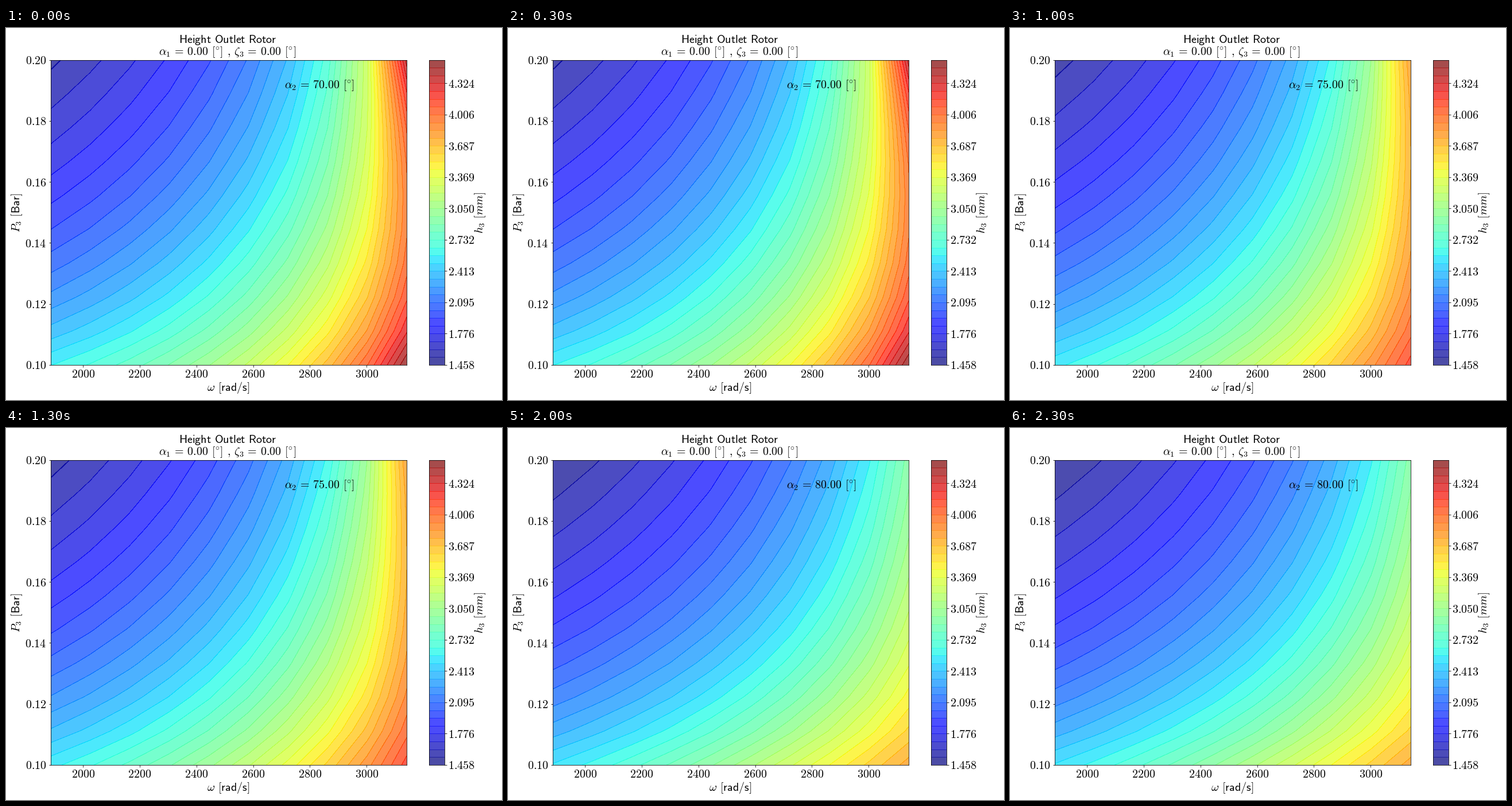
A matplotlib script for the animation above (2500 ms loop, 864 by 648 pixels).

```python
import numpy as np
import matplotlib.pyplot as plt
from matplotlib.animation import FuncAnimation
from matplotlib.colors import Normalize

W, H, DPI = 864, 648, 72
FONT = 20
plt.rcParams.update({"mathtext.fontset": "cm", "font.size": FONT})

LEVELS = np.linspace(1.458, 4.563, 40)
STEP = LEVELS[1] - LEVELS[0]
OMEGA = np.linspace(600 * np.pi, 1000 * np.pi, 10)
PRESSURE = np.linspace(0.1, 0.2, 10)

# Heights in level steps at the knots: angle x pressure x speed
ANGLE_KNOTS = (70, 75, 80)
PRESSURE_KNOTS = (0.10, 0.15, 0.20)
SPEED_KNOTS = OMEGA[[0, 5, 9]] ** 2
KNOTS = np.array([
    [[13.95, 22.2, 38.99], [5.31, 13.15, 31.7], [0.76, 8.1, 37.5]],
    [[13.65, 21.87, 34.5], [5.13, 12.74, 29.3], [0.56, 7.65, 30.0]],
    [[13.1, 20.75, 29.5], [4.49, 10.87, 22.0], [0.01, 5.87, 18.5]],
])
# The inverse square of the height is smooth in squared speed
INVERSE = (LEVELS[0] + STEP * KNOTS) ** -2.0


def lagrange(x, knots):
    """Weights of the polynomial through the knots, one row per x."""
    x = np.atleast_1d(x).astype(float)
    columns = []
    for i, a in enumerate(knots):
        weight = np.ones_like(x)
        for j, b in enumerate(knots):
            if j != i:
                weight = weight * (x - b) / (a - b)
        columns.append(weight)
    return np.stack(columns, axis=1)


SPEED_W = lagrange(OMEGA ** 2, SPEED_KNOTS)
PRESSURE_W = lagrange(PRESSURE, PRESSURE_KNOTS)


def height(angle):
    angle_w = lagrange(angle, ANGLE_KNOTS)[0]
    q = np.einsum("a,aps,yp,xs->yx", angle_w, INVERSE, PRESSURE_W, SPEED_W)
    return np.clip(q ** -0.5, LEVELS[0] + 1e-4, LEVELS[-1] - 1e-4)


def sans(text):
    """Sans-serif math text with full word spaces."""
    text = text.replace(" = ", r"\hspace{0.18}=\hspace{0.18}")
    text = text.replace(" , ", r"\hspace{0.38},\hspace{0.18}")
    text = text.replace(" ", r"\hspace{0.38}")
    return r"\mathsf{" + text + "}"


def angle_text(symbol, value):
    return symbol + sans(f" = {value:.2f} [") + r"^{\circ}" + sans("]")


def box(left, top, right, bottom):
    return fig.add_axes([left / W, 1 - bottom / H,
                         (right - left) / W, (bottom - top) / H])


def label(x, y, text, **kw):
    return fig.text(x, H - y, f"${text}$", transform=None, fontsize=FONT,
                    va="baseline", **{"ha": "center", **kw})


fig = plt.figure(figsize=(W / DPI, H / DPI), dpi=DPI, facecolor="white")
ax = box(77.5, 55.5, 698, 587)
bar = box(737, 55.5, 763.5, 587)

ax.set_xlim(OMEGA[0], OMEGA[-1])
ax.set_ylim(PRESSURE[0], PRESSURE[-1])
ax.set_xticks(range(2000, 3001, 200))
ax.set_yticks(np.linspace(0.1, 0.2, 6))
ax.xaxis.set_major_formatter("${x:.0f}$")
ax.yaxis.set_major_formatter("${x:.2f}$")

# Colour bar
line_norm = Normalize(LEVELS[0], LEVELS[-1])
bands = plt.cm.jet(np.linspace(0, 1, len(LEVELS) - 1))
for low, color in zip(LEVELS, bands):
    bar.axhspan(low, low + STEP, facecolor=color, alpha=0.7, lw=0,
                antialiased=False)
bar.hlines(LEVELS[1:-1], 0, 1, colors=plt.cm.jet(line_norm(LEVELS[1:-1])),
           lw=0.7, alpha=0.8)
bar.set_xlim(0, 1)
bar.set_ylim(LEVELS[0], LEVELS[-1])
bar.set_xticks([])
bar.yaxis.tick_right()
bar.set_yticks(LEVELS[::4])
bar.yaxis.set_major_formatter("${x:.3f}$")

# Titles and axis labels
label(386, 25.5, sans("Height Outlet Rotor"))
label(386, 47.5, angle_text(r"\alpha_1", 0) + sans(" , ")
      + angle_text(r"\zeta_3", 0))
label(387, 632, r"\omega" + sans(" [rad/s]"))
upright = dict(rotation=90, rotation_mode="anchor")
label(24, 322, "P_3" + sans(" [Bar]"), **upright)
label(831, 322, r"h_3\hspace{0.38}[mm]", **upright)
note = label(485, 105, "", ha="left")

drawn = []


def update(frame):
    while drawn:
        drawn.pop().remove()
    angle = 70 + 2.5 * frame
    grid = (OMEGA, PRESSURE, height(angle))
    drawn.append(ax.contourf(*grid, levels=LEVELS, cmap="jet", alpha=0.7))
    drawn.append(ax.contour(*grid, levels=LEVELS[1:-1], cmap="jet",
                            norm=line_norm, linewidths=0.7, alpha=0.8))
    note.set_text(f"${angle_text(r'{}'.format(chr(92) + 'alpha_2'), angle)}$")
    return drawn + [note]


anim = FuncAnimation(fig, update, frames=5, init_func=lambda: [],
                     interval=500, repeat=True, repeat_delay=0, blit=False)
plt.show()
```
